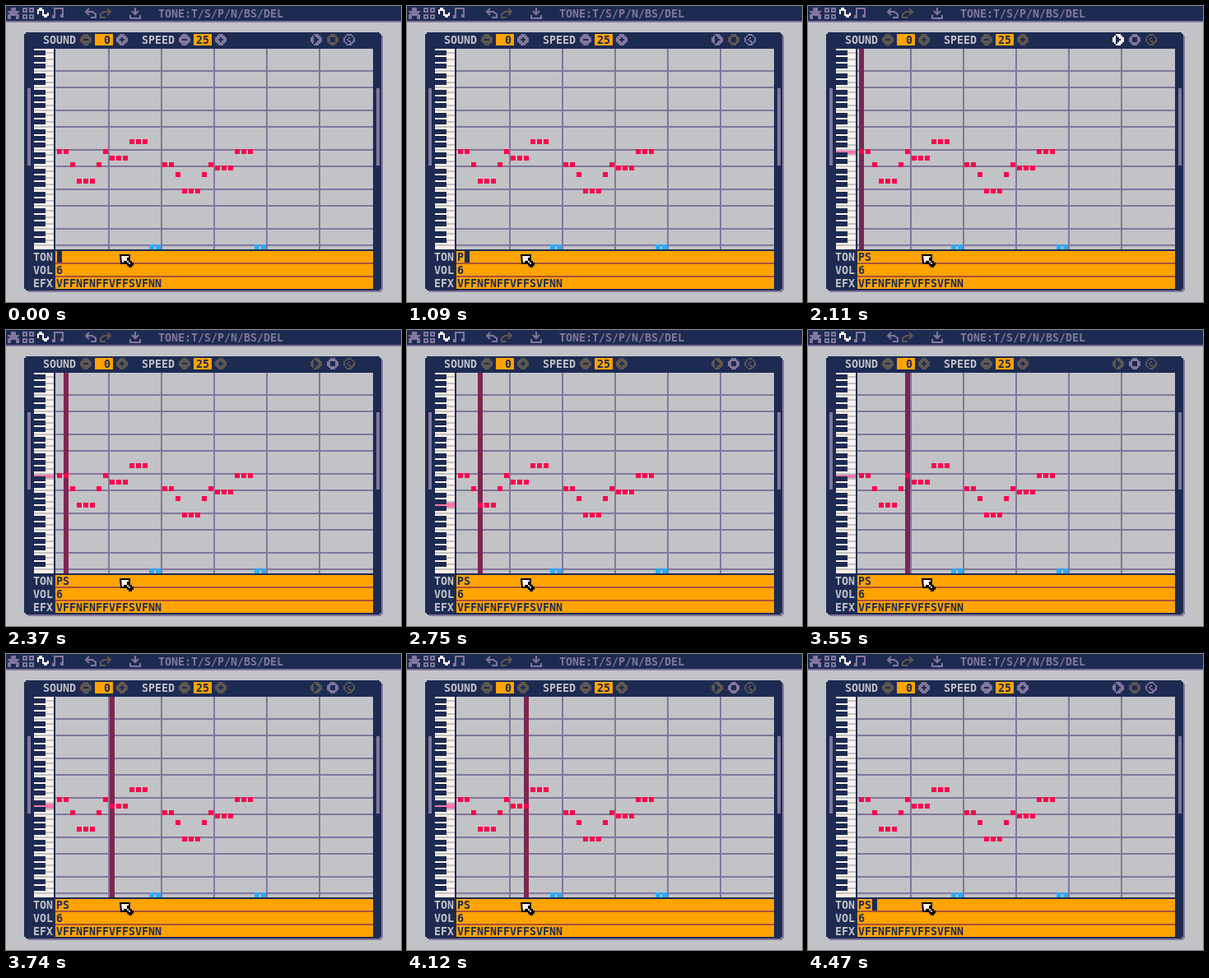
Animation, 480 px wide and 360 px high, one loop 5630 ms. Source, as an HTML page with a canvas:

```html
<!DOCTYPE html>
<html lang="en">
<head>
<meta charset="utf-8">
<title>Sound composer</title>
<style>
  html, body { margin: 0; width: 100%; height: 100%; overflow: hidden; background: #c2c3c7; }
  canvas { display: block; }
</style>
</head>
<body>
<canvas id="stage" width="480" height="360"></canvas>
<script>
const ctx = document.getElementById('stage').getContext('2d');

const NAVY = '#1d2b53', GREY = '#c2c3c7', MAUVE = '#83769c', DIM = '#5f574f', WHITE = '#fff1e8',
      RED = '#ff004d', ORANGE = '#ffa300', BROWN = '#ab5236', BLUE = '#29adff', PLUM = '#7e2553', PINK = '#ff77a8';

const LOOP = 5630, PLAY = 2110, RELEASE = 2240, STOP = 4390, IDLE = 4470;
const STEPS = [PLAY, 2370, 2560, 2750, 2940, 3130, 3320, 3550, 3740, 3930, 4120, 4310];

// Keyboard rows from the top; the top row is a B.
const NOTES = [31, 31, 35, 40, 40, 40, 35, 31, 33, 33, 33, 28, 28, 28, 60, 60,
               35, 35, 38, 43, 43, 43, 38, 35, 36, 36, 36, 31, 31, 31, 60, 60];
const ROWS = 61, LOWEST = 60;
const rowY = row => 52 + 4 * row;
const colX = col => 62 + 8 * col;
const pitch = row => (71 - row) % 12;
const isBlack = row => [1, 3, 6, 8, 10].includes(pitch(row));
const hasLine = row => pitch(row) === 0 || pitch(row) === 5;

function box(color, x, y, w, h) {
  ctx.fillStyle = color;
  ctx.fillRect(x, y, w, h);
}

function line(color, path) {
  ctx.strokeStyle = color;
  ctx.lineWidth = 2;
  ctx.stroke(new Path2D(path));
}

function shape(color, path) {
  ctx.fillStyle = color;
  ctx.fill(new Path2D(path));
}

function text(color, string, x, top) {
  ctx.font = 'bold 13.29px "DejaVu Sans Mono", monospace';
  ctx.fillStyle = color;
  ctx.fillText(string, x - 1, top + 10);
}

function disc(color, x) {
  box(color, x + 4, 34, 6, 14);
  box(color, x + 2, 36, 10, 10);
  box(color, x, 38, 14, 6);
}

function stepper(label, x, value, minus, plus) {
  const field = x + 18;
  text(GREY, label, x - 44, 36);
  disc(minus, x);
  box(NAVY, x + 4, 40, 6, 2);
  box(ORANGE, field, 34, 22, 14);
  text(NAVY, value.padStart(2), field + 4, 36);
  disc(plus, x + 44);
  box(NAVY, x + 48, 40, 6, 2);
  box(NAVY, x + 50, 38, 2, 6);
}

function drawToolbar() {
  box(NAVY, 0, 0, 480, 18);
  box(MAUVE, 0, 18, 480, 2);
  shape(MAUVE, 'M6 2h6v4h4v2h-2v2h2v6h-4v-4h-6v4h-4v-6h2v-2h-2v-2h4z');
  line(MAUVE, 'M21 3h4v4h-4zM29 3h4v4h-4zM21 11h4v4h-4zM29 11h4v4h-4z');
  line(WHITE, 'M39 10V5h2V3h2v2h2v6h2v2h2v-2h2V8');
  line(MAUVE, 'M59 13V3h10v9');
  box(MAUVE, 56, 11, 4, 4);
  box(MAUVE, 66, 10, 4, 4);
  line(MAUVE, 'M101 3l-4 4 4 4M97 7h8l4 3v4h-6');
  line(DIM, 'M123 3l4 4-4 4M127 7h-8l-4 3v4h6');
  line(MAUVE, 'M157 2v8M153 6l4 4 4-4M151 11v4h12v-4');
  text(MAUVE, 'TONE:T/S/P/N/BS/DEL', 186, 4);
}

function drawPanel() {
  for (const [color, x, y] of [[MAUVE, 24, 34], [NAVY, 22, 32]]) {
    box(color, x + 2, y, 430, 314);
    box(color, x, y + 2, 434, 310);
  }
  box(MAUVE, 26, 100, 4, 94);
  box(MAUVE, 450, 100, 4, 94);
}

function drawHeader(playing, t) {
  const edit = playing ? DIM : MAUVE;
  stepper('SOUND', 90, '0', DIM, edit);
  stepper('SPEED', 210, '25', edit, edit);
  disc(t >= PLAY && t < RELEASE ? WHITE : edit, 370);
  shape(NAVY, 'M374 36v10h2v-2h2v-2h2v-2h-2v-2h-2v-2z');
  disc(t >= STOP && t < IDLE ? WHITE : playing ? MAUVE : DIM, 390);
  box(NAVY, 394, 38, 6, 6);
  disc(edit, 410);
  line(NAVY, 'M418 45h-3v-2h-2v-4h2v-2h4v2h2v3M416 41h4v3');
}

function drawKeys(active) {
  box(WHITE, 34, 52, 24, 244);
  if (active !== undefined) box(PINK, 34, rowY(active) - 2, 24, 6);
  for (let row = 0; row < ROWS; row++) {
    const y = rowY(row);
    if (isBlack(row)) {
      box(GREY, 48, y, 10, 2);
      box(NAVY, 34, y - 2, 14, 6);
    }
    if (hasLine(row)) box(GREY, 34, y + 2, 24, 2);
  }
}

function drawGrid(column) {
  box(GREY, 60, 52, 386, 244);
  for (let row = 0; row < ROWS; row++) {
    if (hasLine(row)) box(MAUVE, 60, rowY(row) + 2, 386, 2);
  }
  for (let x = 124; x < 440; x += 64) box(MAUVE, x, 52, 2, 244);
  if (column >= 0) box(PLUM, colX(column), 52, 6, 244);
  NOTES.forEach((row, col) => box(row === LOWEST ? BLUE : RED, colX(col), rowY(row) - 2, 6, 6));
}

function drawFields(typed, caret) {
  box(BROWN, 60, 298, 386, 46);
  [['TON', typed], ['VOL', '6'], ['EFX', 'VFFNFNFFVFFSVFNN']].forEach(([label, value], i) => {
    const y = 298 + 16 * i;
    box(ORANGE, 60, y, 386, 14);
    text(GREY, label, 34, y + 2);
    text(NAVY, value, 62, y + 2);
  });
  if (caret) box(NAVY, colX(typed.length), 298, 6, 14);
}

function drawPointer() {
  const arrow = 'M139 303h11v4h-2v2h2v2h2v2h2v2h-2v2h-2v-2h-2v-2h-2v-2h-2v2h-4z';
  shape(WHITE, arrow);
  line('#000', arrow);
}

function draw(now) {
  const t = now % LOOP;
  const playing = t >= PLAY && t < STOP;
  const column = playing ? STEPS.filter(start => start <= t).length - 1 : -1;
  const typed = 'PS'.slice(0, (t >= 1090) + (t >= 1550));

  box(GREY, 0, 0, 480, 360);
  drawToolbar();
  drawPanel();
  drawHeader(playing, t);
  drawKeys(NOTES[column]);
  drawGrid(column);
  drawFields(typed, !playing);
  drawPointer();
  requestAnimationFrame(() => draw(performance.now() - start));
}

const start = performance.now();
draw(0);
</script>
</body>
</html>
```
